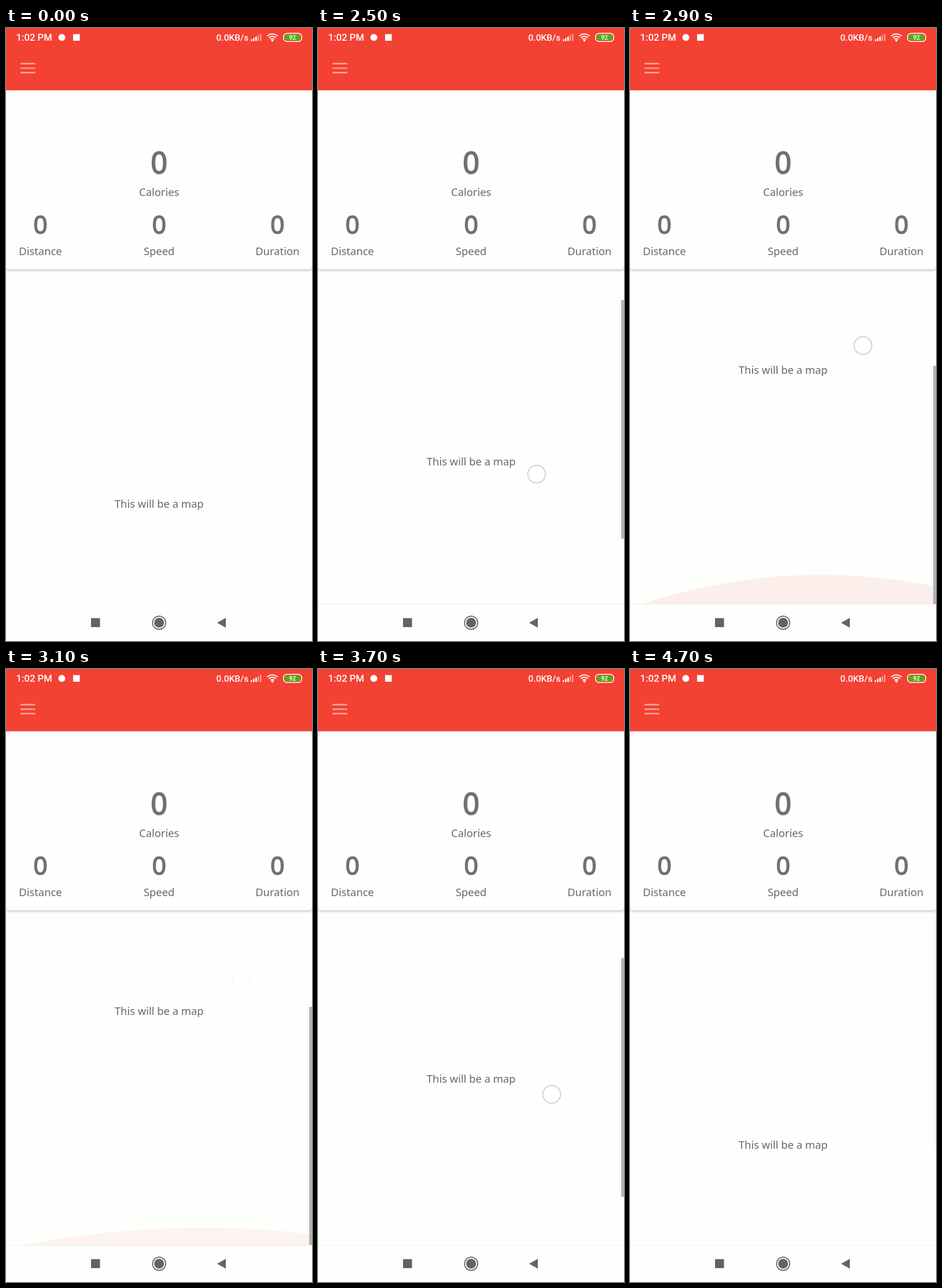
Animation of 529 by 1058 pixels, one loop 5.2 s. Source, as an HTML page:

```html
<!DOCTYPE html>
<html lang="en">
<head>
<meta charset="utf-8">
<title>Workout screen</title>
<style>
  html, body { margin: 0; width: 100%; height: 100%; overflow: hidden; background: #fdfffc; }
  svg { display: block; width: 100%; height: 100%; }
  .label { font: 18.4px "Noto Sans", sans-serif; fill: #686967; text-anchor: middle; }
  .value { font: 43px "Noto Sans", sans-serif; fill: #71726f; stroke: #71726f; stroke-width: 1.5; text-anchor: middle; }
  .big { font-size: 50.5px; stroke-width: 1.8; }
  .status { font: 500 16.7px Roboto, sans-serif; fill: #fff; }
  .card { filter: drop-shadow(0 2px 2px rgba(0, 0, 0, .24)); }
</style>
</head>
<body>
<svg viewBox="0 0 529 1058">
  <defs>
    <clipPath id="view"><rect y="417" width="529" height="577.5"/></clipPath>
  </defs>
  <rect width="529" height="1058" fill="#fdfffc"/>

  <g clip-path="url(#view)">
    <text id="map" class="label" x="264.7" y="828">This will be a map</text>
    <path id="glow" fill="#f44336"/>
    <rect id="bar" x="524" width="5" height="412" fill="#b2b4b1"/>
  </g>

  <rect class="card" y="90" width="529" height="326.5" rx="5" fill="#fdfffc"/>
  <g id="stats"></g>

  <rect width="529" height="107.5" fill="#f34133"/>
  <path d="M25 61.5H50.500M25 69.300H50.500M25 77H50.500" stroke="#f9aaa2" stroke-width="2.3"/>

  <g fill="#fff">
    <text class="status" x="17.5" y="22.3">1:02 PM</text>
    <circle cx="96.500" cy="16.300" r="6"/>
    <rect x="116" y="10.500" width="11.500" height="11.500"/>
    <text class="status" x="363.5" y="22.3" style="font-size:15.5px">0.0KB/s</text>
    <g id="signal"></g>
    <circle cx="460.500" cy="21.500" r="1.900"/>
  </g>
  <path d="M451.500 13.800Q460.500 6.500 469.500 13.800M454.300 16.800Q460.500 11.800 466.700 16.800M457 19.500Q460.500 16.800 464 19.500"
    fill="none" stroke="#fff" stroke-width="1.800"/>
  <rect x="479.700" y="9.300" width="31.600" height="14" rx="6" fill="none" stroke="#fff" stroke-width="1.500"/>
  <rect x="482" y="11.500" width="27" height="9.600" rx="4" fill="#42b80f"/>
  <text class="status" x="495.300" y="20" text-anchor="middle" style="font-size:10.5px">92</text>

  <path id="divider" d="M0 994.500H529" stroke="#eeefec"/>
  <g fill="#636462">
    <rect x="147" y="1018.500" width="15.500" height="15.500"/>
    <circle cx="264.700" cy="1026.500" r="8.500"/>
    <circle cx="264.700" cy="1026.500" r="11.400" fill="none" stroke="#636462" stroke-width="1.700"/>
    <path d="M365 1026.500L380 1018V1035Z"/>
  </g>

  <circle id="ring" r="15.300" fill="#fff" fill-opacity=".5" stroke="#d0d3d9" stroke-width="2"/>
</svg>
<script>
const LOOP = 5200, STEP = 100;
const MAX_SCROLL = 231, SLOP = 11, BAR_RATIO = 166 / MAX_SCROLL;
const $ = id => document.getElementById(id);
const clamp = (v, lo, hi) => Math.min(hi, Math.max(lo, v));
const set = (el, attrs) => { for (const k in attrs) el.setAttribute(k, attrs[k]); };

// Linear track through [time, value] points, held at both ends.
function track(t, ...keys) {
  if (t <= keys[0][0]) return keys[0][1];
  for (let i = 1; i < keys.length; i++) {
    const [t0, a] = keys[i - 1], [t1, b] = keys[i];
    if (t <= t1) return a + (b - a) * (t - t0) / (t1 - t0);
  }
  return keys[keys.length - 1][1];
}

const stats = [["Calories", 264.7, 251, 290, "value big"], ["Distance", 59.5, 355, 391.5, "value"],
  ["Speed", 264.7, 355, 391.5, "value"], ["Duration", 469.3, 355, 391.5, "value"]];
$("stats").innerHTML = stats.map(([name, x, y, labelY, cls]) =>
  `<text class="${cls}" x="${x}" y="${y}">0</text><text class="label" x="${x}" y="${labelY}">${name}</text>`).join("");
$("signal").innerHTML = [0, 1, 2, 3, 4].map(i =>
  `<rect x="${423 + i * 4}" y="${19.5 - i * 2.4}" width="2.600" height="${3 + i * 2.4}" opacity="${i < 3 ? 1 : 0.45}"/>`).join("");

function finger(t) {
  if (t < 3300) return {
    x: track(t, [2300, 362.5], [2800, 401], [3100, 406]),
    y: track(t, [2300, 854], [2400, 830], [2500, 770], [2600, 690], [2700, 622], [2800, 578], [2900, 548], [3000, 536]),
    alpha: t < 2300 ? 0 : track(t, [2300, .4], [2400, 1], [2900, 1], [3000, .7], [3100, .12], [3200, 0])
  };
  return {
    x: track(t, [3500, 399], [3700, 404], [3900, 407]),
    y: track(t, [3500, 610], [3600, 655], [3700, 734], [3800, 800], [3900, 822]),
    alpha: t < 3500 ? 0 : track(t, [3500, .4], [3600, 1], [3800, 1], [3900, .7], [4000, .12], [4100, 0])
  };
}

function scrollAt(t, y) {
  if (t < 3300) return clamp(854 - SLOP - y, 0, MAX_SCROLL);
  if (t <= 3800) return clamp(MAX_SCROLL - (y - 606 - SLOP), 0, MAX_SCROLL);
  return 48 * (1 - clamp((t - 3800) / 300, 0, 1)) ** 2;
}

function barAlpha(t) {
  if (t < 2400) return 0;
  if (t < 3550) return track(t, [3330, 1], [3530, .1]);
  return track(t, [4500, 1], [4600, .6], [4700, .07]);
}

// Edge glow swells with the pull, then recedes after release.
function drawGlow(t) {
  const left = (1 - clamp((t - 2950) / 450, 0, 1)) ** 1.5;
  const h = track(t, [2680, 0], [2800, 42], [2950, 55]) * left;
  const alpha = track(t, [2680, 0], [2800, .04], [2950, .115]) * left;
  const cx = track(t, [2700, 290], [2800, 310], [2950, 340]), half = 312;
  set($("glow"), { d: `M${cx - half} 994.500Q${cx} ${994.5 - 2 * h} ${cx + half} 994.500Z`, opacity: alpha });
}

function draw(t) {
  const { x, y, alpha } = finger(t), scroll = scrollAt(t, y);
  set($("ring"), { cx: x, cy: y, opacity: alpha });
  set($("map"), { y: 828 - scroll });
  set($("bar"), { y: 417 + scroll * BAR_RATIO, opacity: barAlpha(t) });
  set($("divider"), { opacity: t < 2400 ? 0 : 1 });
  drawGlow(t);
}

const start = performance.now();
function tick() {
  const t = (performance.now() - start) % LOOP;
  draw(Math.floor(t / STEP) * STEP);
  requestAnimationFrame(tick);
}
tick();
</script>
</body>
</html>
```
